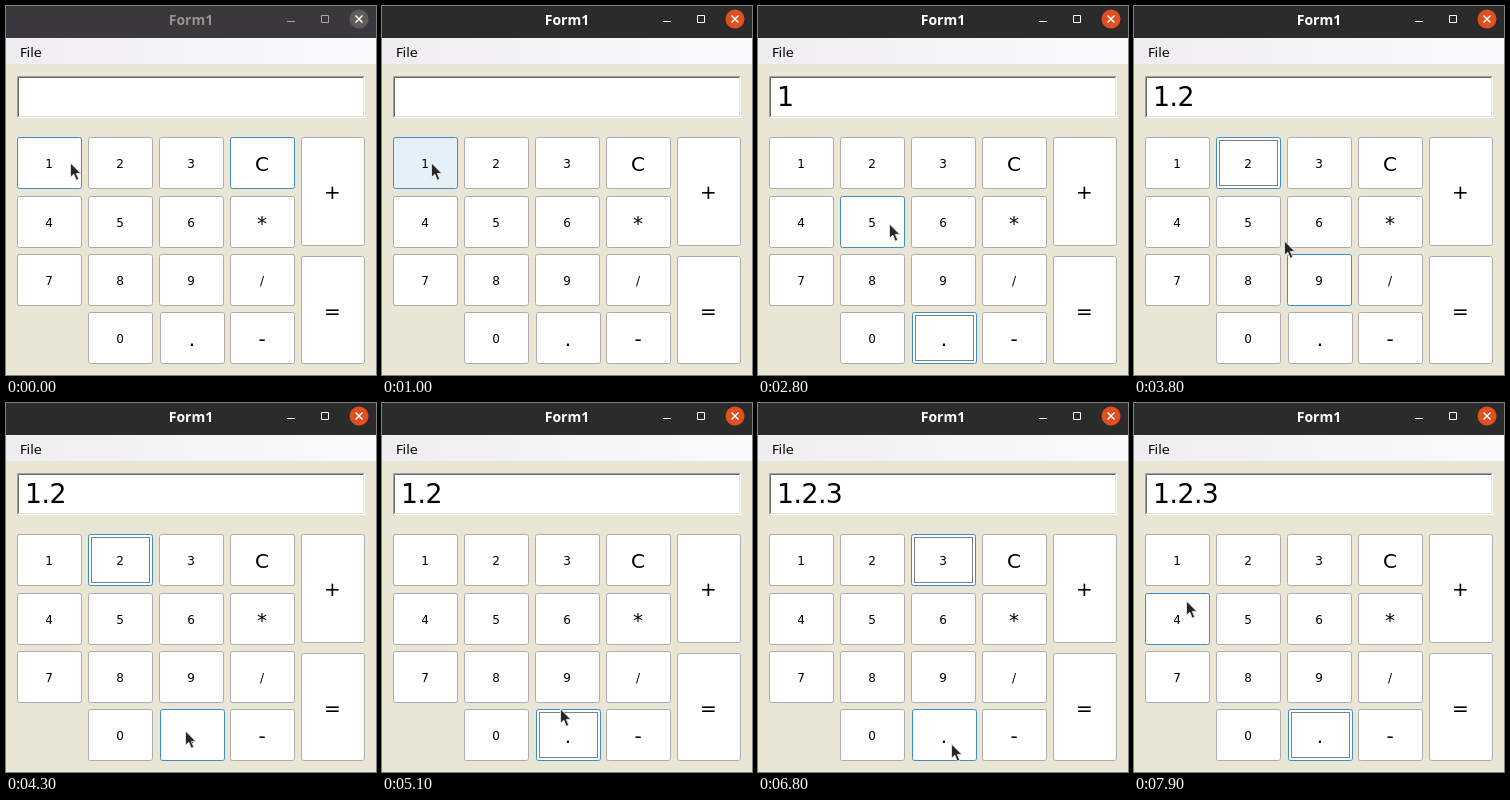
These frames come from a looping animation (370 px wide and 369 px high, 8000 ms). An HTML page:

```html
<!DOCTYPE html>
<html lang="en">
<head>
<meta charset="utf-8">
<title>Calculator</title>
<style>
  html, body { margin: 0; width: 100%; height: 100%; overflow: hidden; background: #e9e6d6; }
  svg { display: block; width: 370px; height: 369px; font-family: "DejaVu Sans", Verdana, sans-serif; }
  .title { font: 700 14px "Noto Sans", "Open Sans", sans-serif; }
  .focus { fill: none; stroke: #000; stroke-dasharray: 1 1; }
</style>
</head>
<body>
<svg id="stage" viewBox="0 0 370 369">
  <defs>
    <linearGradient id="menu">
      <stop offset="0" stop-color="#efedf0"/>
      <stop offset="1" stop-color="#fbfafc"/>
    </linearGradient>
  </defs>
  <rect width="370" height="369" fill="#e9e6d6"/>
  <rect id="bar" width="370" height="32"/>
  <g id="chrome" fill="none">
    <text id="caption" class="title" x="185" y="19" text-anchor="middle">Form1</text>
    <path id="tools" d="M281 15.5h8M315.5 9.5h7v7h-7z"/>
    <circle id="close" cx="353" cy="13" r="9.5"/>
    <path d="M349.5 9.5l7 7M356.5 9.5l-7 7" stroke="#fff" stroke-width="1.5"/>
  </g>
  <rect y="32" width="370" height="26" fill="url(#menu)"/>
  <text x="14" y="51" font-size="13">File</text>
  <rect x="11" y="70" width="348" height="42" fill="#fff"/>
  <path d="M11.5 111.5V70.5H358.5" fill="none" stroke="#a0a0a0"/>
  <path d="M12.5 110.5V71.5H357.5" fill="none" stroke="#696969"/>
  <path d="M12.5 110.5H357.5V71.5" fill="none" stroke="#dedede"/>
  <text id="display" x="19" y="100" font-size="26.67" letter-spacing="-.5"></text>
  <g id="keys"></g>
  <path id="cursor" d="M1.5 1V15.2L4.8 12.2L7.3 18.2L9.8 17.1L7.3 11.4H11.9Z"
        fill="#262626" stroke="#e8e8e8" stroke-width=".9" stroke-linejoin="round"/>
</svg>
<script>
const LOOP = 8000;
const BLUE = "#3f8dc4";
const $ = id => document.getElementById(id);

function add(parent, tag, attrs, text = "") {
  const el = document.createElementNS("http://www.w3.org/2000/svg", tag);
  for (const name in attrs) el.setAttribute(name, attrs[name]);
  el.textContent = text;
  return parent.appendChild(el);
}

const keys = {};
function addKey(label, x, y, h = 51, w = 64) {
  const size = /[0-9/]/.test(label) ? 12 : 20;
  const box = add($("keys"), "rect", { x, y, width: w, height: h, rx: 2 });
  add($("keys"), "text", {
    x: x + w / 2 - .5, y: y + h / 2 + (size === 12 ? 5 : 7.5),
    "font-size": size, "text-anchor": "middle"
  }, label);
  const focus = add($("keys"), "rect", {
    class: "focus", x: x + 3, y: y + 3, width: w - 6, height: h - 6
  });
  keys[label] = { box, focus };
}

const rowTops = [131.5, 190.5, 248.5, 306.5];
["123C", "456*", "789/", " 0.-"].forEach((row, r) => {
  [...row].forEach((label, c) => {
    if (label !== " ") addKey(label, 11.5 + 71 * c + (label === "." ? 1 : 0), rowTops[r]);
  });
});
addKey("+", 295.5, 131.5, 108, 63);
addKey("=", 295.5, 250.5, 107, 63);

// time, pointer x, pointer y, hovered key
const pointer = [
  [0, 63, 156, "1"], [200, 49, 156, "1"], [400, 48, 156, "1"],
  [1600, 84, 200, "5"], [1700, 118, 246, "8"], [1800, 155, 292, "."], [1900, 177, 314, "."],
  [2200, 180, 324, "."],
  [2600, 172, 303, "."], [2700, 150, 258, "8"], [2800, 130, 217, "5"],
  [2900, 119, 184, "5"], [3000, 111, 158, "2"], [3100, 108, 143, "2"],
  [3800, 149, 234, "9"], [3900, 162, 270, "9"], [4000, 169, 293, "."],
  [4200, 174, 314, "."], [4300, 178, 327, "."],
  [5100, 177, 305, "."], [5200, 175, 260, "9"], [5300, 174, 213, "6"],
  [5400, 175, 172, "3"], [5500, 176, 153, "3"],
  [6400, 203, 296, "."], [6500, 216, 347, "."], [6700, 200, 342, "."], [6800, 192, 340, "."],
  [7400, 172, 310, "."], [7500, 138, 277, "8"], [7600, 115, 257, ""],
  [7800, 76, 222, ""], [7900, 51, 197, "4"]
];
const active = [[0, false], [1000, true]];
const selected = [[0, "C"], [1000, "1"], [2400, "."], [3200, "2"], [4800, "."], [5800, "3"], [7300, "."]];
const dotted = [[0, ""], [1100, "1"], [2400, "."], [3200, ""], [3400, "2"], [4800, "."],
  [5800, ""], [5900, "3"], [7300, "."]];
const pressed = [[0, ""], [1000, "1"], [1100, ""], [4600, "."], [4800, ""], [7100, "."], [7300, ""]];
const shown = [[0, ""], [1100, "1"], [3400, "1.2"], [5900, "1.2.3"]];

const at = (track, t) => track.findLast(step => step[0] <= t).slice(1);

function render(t) {
  const [x, y, hover] = at(pointer, t);
  const [on] = at(active, t), [chosen] = at(selected, t);
  const [outlined] = at(dotted, t), [down] = at(pressed, t);

  $("bar").setAttribute("fill", on ? "#2b2b2b" : "#3b383d");
  $("caption").setAttribute("fill", on ? "#fff" : "#96938f");
  $("tools").setAttribute("stroke", on ? "#fff" : "#aaa7a4");
  $("close").setAttribute("fill", on ? "#e0501f" : "#605d5c");
  $("display").textContent = at(shown, t)[0];
  $("cursor").setAttribute("transform", `translate(${x} ${y})`);

  for (const label in keys) {
    const { box, focus } = keys[label];
    box.setAttribute("stroke", label === hover || label === chosen ? BLUE : "#adadad");
    box.setAttribute("fill", label === down ? "#e6f0f8" : "#fefefe");
    focus.setAttribute("visibility", label === outlined ? "visible" : "hidden");
  }
}

const start = performance.now();
function tick() {
  render((performance.now() - start) % LOOP);
  requestAnimationFrame(tick);
}
tick();
</script>
</body>
</html>
```
